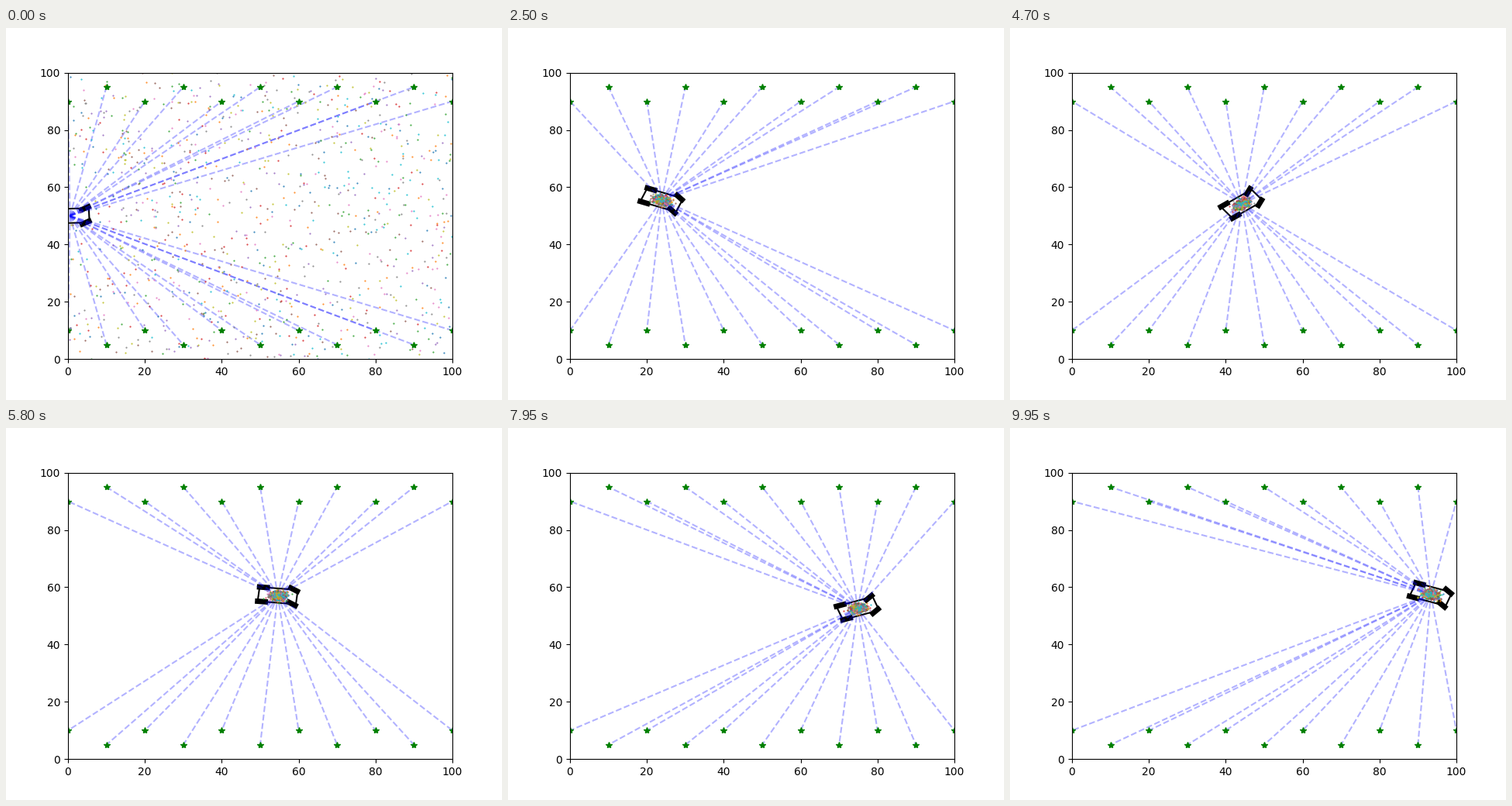
A matplotlib script that plays this animation: 640x480 px, repeating every 10000 ms.

```python
import numpy as np
import matplotlib.pyplot as plt
from matplotlib.animation import FuncAnimation

FRAMES = 200
SPEED = 0.5
STEER = 0.5
WHEELBASE = 8.0
PARTICLES = 1000
GROUPS = 50
TURNS = [20, 58, 95, 132, 170]  # steps at which the steering flips

# Bicycle model driven by full-lock steering to alternating sides
steps = np.arange(FRAMES)
steer = np.where(np.searchsorted(TURNS, steps, side="right") % 2, -STEER, STEER)
turn = SPEED * np.tan(steer) / WHEELBASE
heading = np.cumsum(turn)
mid = heading - turn / 2
path = np.column_stack([np.cumsum(SPEED * np.cos(mid)),
                        50 + np.cumsum(SPEED * np.sin(mid))])

marks = np.array([(x, edge + side * (x // 10 % 2) * 5)
                  for edge, side in ((10, -1), (90, 1))
                  for x in range(0, 101, 10)])

BODY = np.array([(5, 2.5), (-5, 2.5), (-5, -2.5), (5, -2.5), (5, 2.5)])
WHEELS = np.array([(4, 2.5), (4, -2.5), (-4, 2.5), (-4, -2.5)])
ROLL = np.array([(-1, 0), (1, 0)])


def rotate(points, angle):
    c, s = np.cos(angle), np.sin(angle)
    return points @ np.array([(c, s), (-s, c)])


def cloud(i):
    """Particle positions: uniform at first, then gathered around the car."""
    rng = np.random.default_rng(100 + i)
    if i == 0:
        return rng.uniform(0, 100, (PARTICLES, 2))
    spread = np.array([1.05, 0.72]) * (1 + np.exp(-i))
    return path[i] + rotate(rng.normal(0, spread, (PARTICLES, 2)), heading[i])


fig, ax = plt.subplots(figsize=(6.4, 4.8), dpi=100)
ax.set_xlim(0, 100)
ax.set_ylim(0, 100)

body, = ax.plot([], [], "k-", lw=1.5)
wheels = [ax.plot([], [], "k-", lw=5)[0] for _ in WHEELS]
rays = [ax.plot([], [], "b--", lw=1.5, alpha=0.3)[0] for _ in marks]
dots = [ax.plot([], [], ".", ms=1, color=f"C{g % 10}")[0] for g in range(GROUPS)]
ax.plot(*marks.T, "*", color="green", ms=6)


def update(i):
    pos, angle = path[i], heading[i]
    body.set_data(*(pos + rotate(BODY, angle)).T)
    for n, (line, hub) in enumerate(zip(wheels, WHEELS)):
        wheel = hub + rotate(ROLL, steer[i] if n < 2 else 0)
        line.set_data(*(pos + rotate(wheel, angle)).T)
    for line, mark in zip(rays, marks):
        line.set_data(*np.array([pos, mark]).T)
    for line, part in zip(dots, np.split(cloud(i), GROUPS)):
        line.set_data(*part.T)
    return [body, *wheels, *rays, *dots]


anim = FuncAnimation(fig, update, frames=FRAMES, interval=50,
                     init_func=lambda: update(0), repeat=True, repeat_delay=0)
plt.show()
```
